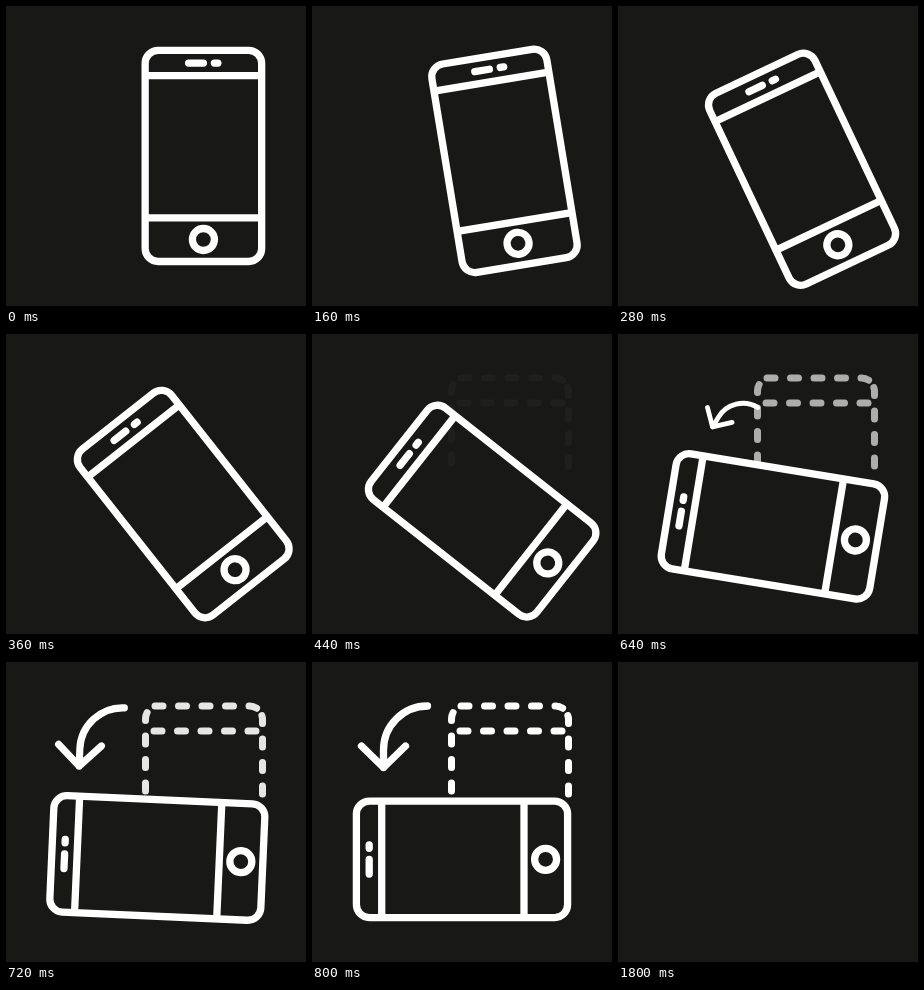
These frames come from a looping animation (300 px wide and 300 px high, 1840 ms). An HTML page:

```html
<!DOCTYPE html>
<html lang="en">
<head>
<meta charset="utf-8">
<title>Rotate your phone</title>
<style>
  html, body { margin: 0; width: 100%; height: 100%; overflow: hidden; background: #181816; }
  svg { display: block; width: 100%; height: 100%; }
  svg * { fill: none; stroke-linecap: round; stroke-linejoin: round; }
  #scene { stroke: #fff; stroke-width: 7.3; }
  #ghost { stroke-width: 7; stroke-dasharray: 8 15.5; }
</style>
</head>
<body>
<svg viewBox="0 0 300 300">
  <g id="scene">
    <g id="ghost">
      <path d="M139.5 129V57A13 13 0 0 1 143.5 47.5"/>
      <path d="M149 44H243.5A13 13 0 0 1 251 46.5"/>
      <path d="M256.5 132V57A13 13 0 0 0 254 50"/>
      <path d="M148 69H252"/>
    </g>
    <path id="arrow" d="M115.5 44A44 44 0 0 0 71.5 88V105.5M49.5 84L71.5 105.5L93.5 84"/>
    <g id="phone">
      <rect x="-58.25" y="-105.6" width="116.5" height="211.2" rx="13"/>
      <path d="M-58 -80.3H58M-58 62H58" style="stroke-linecap:butt"/>
      <path d="M-14.8 -92.8H0M11 -92.8H14.5"/>
      <circle cy="83.6" r="11"/>
    </g>
  </g>
</svg>
<script>
  const LOOP = 1840, STEP = 40, BLANK = 1800;
  const [scene, ghost, arrow, phone] =
    ["scene", "ghost", "arrow", "phone"].map(id => document.getElementById(id));

  // Smooth ease-in-out progress between two times
  const ease = (t, from, to) => {
    const u = Math.min(1, Math.max(0, (t - from) / (to - from)));
    return u * u * (3 - 2 * u);
  };
  const mix = (a, b, p) => a + (b - a) * p;

  function draw(time) {
    const t = Math.floor((time % LOOP) / STEP) * STEP;
    const turn = ease(t, 0, 800);
    const grow = ease(t, 480, 745);

    scene.style.display = t >= BLANK ? "none" : "";
    phone.setAttribute("transform",
      `translate(${mix(197.4, 150, turn)} ${mix(149.9, 197.3, turn)}) rotate(${-90 * turn})`);
    ghost.setAttribute("opacity", ease(t, 400, 800));
    arrow.style.display = grow ? "" : "none";
    arrow.setAttribute("transform",
      `translate(${mix(116.9, 101.5, grow)} ${mix(95, 118.6, grow)}) ` +
      `rotate(${90 * (1 - grow)}) scale(${grow}) translate(-101.5 -118.6)`);
  }

  const start = performance.now();
  function tick() {
    draw(performance.now() - start);
    requestAnimationFrame(tick);
  }
  tick();
</script>
</body>
</html>
```
